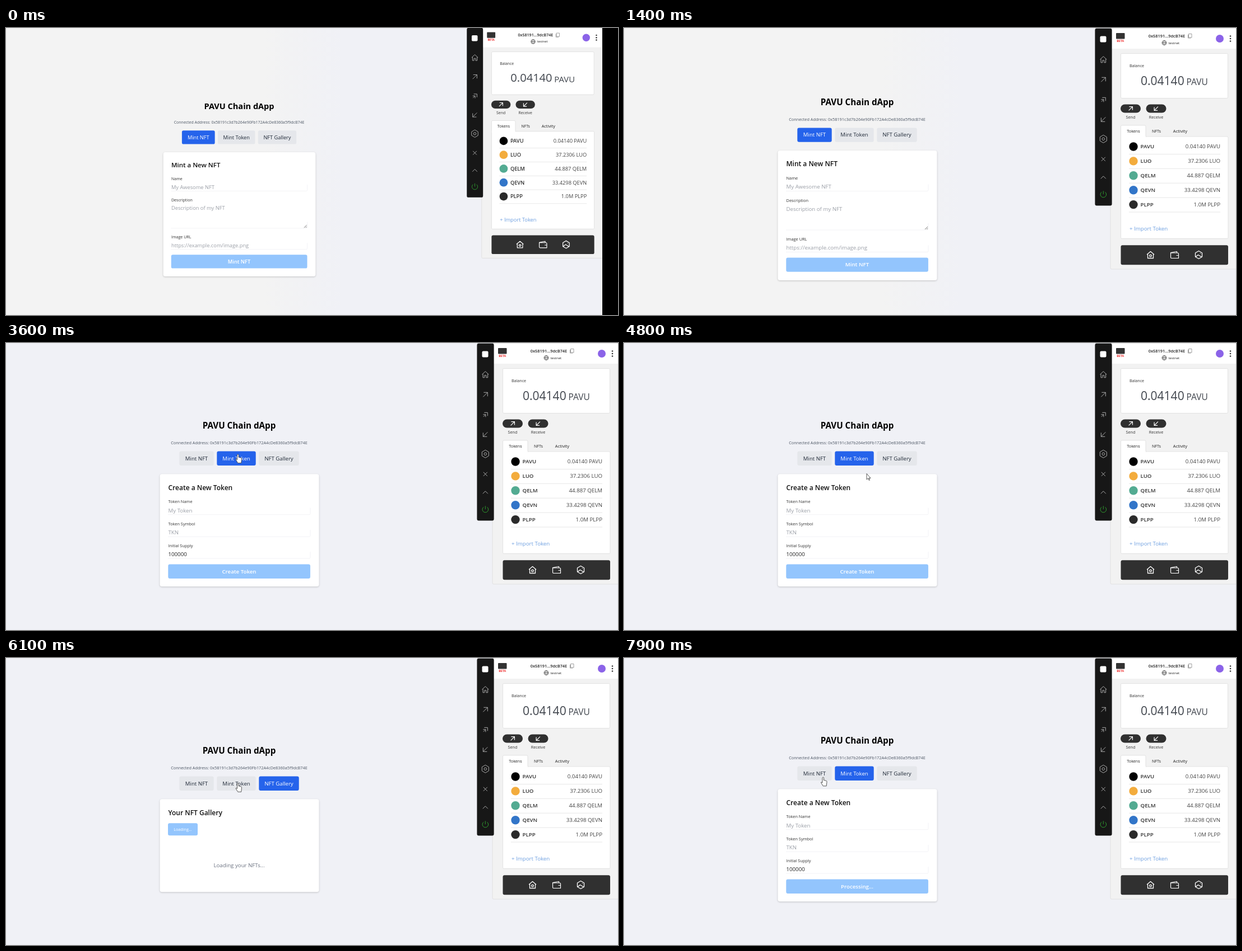
An HTML page that plays this animation: 1092x513 px, repeating every 8 s.

```html
<!DOCTYPE html>
<html lang="en">
<head>
<meta charset="utf-8">
<title>Token minting dApp</title>
<style>
html, body { margin: 0; width: 100%; height: 100%; overflow: hidden; background: #f0f1f6; }
svg { display: block; width: 1092px; height: 513px; font-family: "Open Sans", sans-serif; }
.card { filter: drop-shadow(0 1px 1.5px #0003); }
</style>
</head>
<body>
<svg id="stage" viewBox="0 0 1092 513"></svg>
<script>
const ADDRESS = '0x58191c3d7b264e90Fb172A4cDe8360a5f9dcB74E';
const COIN = 'PAVU';
const stage = document.getElementById('stage');

// Text is placed by the vertical centre of its capitals.
const text = (x, y, str, size, fill = '#222', weight = 400, anchor = 'start') =>
  `<text x="${x}" y="${y + size * .36}" font-size="${size}" fill="${fill}" font-weight="${weight}" text-anchor="${anchor}">${str}</text>`;
const mid = (x, y, str, size, fill, weight) => text(x, y, str, size, fill, weight, 'middle');
const rect = (x, y, w, h, fill, r = 0, extra = '') =>
  `<rect x="${x}" y="${y}" width="${w}" height="${h}" rx="${r}" fill="${fill}" ${extra}/>`;
const circle = (x, y, r, fill) => `<circle cx="${x}" cy="${y}" r="${r}" fill="${fill}"/>`;
const icon = (x, y, d, color = '#aaa', width = 1) =>
  `<path transform="translate(${x} ${y})" d="${d}" fill="none" stroke="${color}" stroke-width="${width}" stroke-linejoin="round"/>`;

const ARROW_OUT = 'M-4 4L4-4M-3-4H4V3';
const ARROW_IN = 'M4-4L-4 4M3 4H-4V-3';
const HOME = 'M-6 0L0-5.5 6 0M-4.3-1V5.5H-1.5V1.5H1.5V5.5H4.3V-1';
const HEXAGON = 'M0-7L6-3.5V3.5L0 7-6 3.5V-3.5Z';

function field(y, label, value, height = 0, color = '#9b9fa7') {
  const bottom = y + 23 + height;
  return text(289.5, y, label, 7.4, '#333', 500) + text(289.5, y + 15.5, value, 9.7, color) +
    icon(289, bottom, 'M0 0H252q2 0 2-2v-10', '#f3f3f6');
}
const card = (height, title) =>
  rect(274.5, 219, 284, height, '#fff', 4, 'class="card"') + text(289.5, 243, title, 12, '#111', 600);
const submit = (y, id, label) => rect(289.3, y + .4, 253.6, 25.4, '#93c5fd', 3) +
  `<g id="${id}">${mid(416, y + 13, label, 9.7, '#fff', 600)}</g>`;

const tabs = [[309, 62, 'Mint NFT'], [376, 70, 'Mint Token'], [451, 72, 'NFT Gallery']];
const views = [
  card(232, 'Mint a New NFT') + field(268.5, 'Name', 'My Awesome NFT') +
    field(308, 'Description', 'Description of my NFT', 30) + icon(539.5, 357.5, 'M-2.5 2.5L2.5-2.5M.5 2.5L2.5.5', '#666', .9) +
    field(377.5, 'Image URL', 'https://example.com/image.png') + submit(410, 'mint', 'Mint NFT'),
  card(201, 'Create a New Token') + field(268.5, 'Token Name', 'My Token') +
    field(308, 'Token Symbol', 'TKN') + field(347, 'Initial Supply', '100000', 0, '#222') +
    submit(380, 'create', 'Create Token'),
  card(166, 'Your NFT Gallery') + rect(289, 262, 53, 22, '#93c5fd', 3) +
    mid(315.5, 273.5, 'Loading...', 7.2, '#fff') + mid(416, 337, 'Loading your NFTs...', 9.7, '#6b7280'),
];
const app = mid(416, 132.5, COIN + ' Chain dApp', 15.2, '#000', 700) +
  mid(416, 163.5, 'Connected Address: ' + ADDRESS, 7.3, '#4b5563') +
  tabs.map(([x, w, name]) => rect(x + .3, 178.4, w - .6, 25.4, '#e5e7eb', 3, 'class="tab"') +
    `<g class="tabname">${mid(x + w / 2, 191, name, 9.6, 'inherit')}</g>`).join('') +
  views.map(v => `<g class="view">${v}</g>`).join('');

const tokens = [
  [COIN, '0.04140', '#000'], ['LUO', '37.2306', '#f3ac3d'], ['QELM', '44.887', '#53ab92'],
  ['QEVN', '33.4298', '#3275c8'], ['PLPP', '1.0M', '#2b2b2b'],
];
const sideIcons = [
  [56, HOME], [92, ARROW_OUT], [128, 'M-2-4H4V2M-4-.5H.5V4M.5-.5L-3.5 3.5'], [163, ARROW_IN],
  [198, HEXAGON + 'M-2.3 0a2.3 2.3 0 1 0 4.6 0a2.3 2.3 0 1 0-4.6 0'],
  [234, 'M-3.5-3.5L3.5 3.5M3.5-3.5L-3.5 3.5'], [267, 'M-4.5 2L0-2.5 4.5 2'],
  [297, 'M-3.2-4a5.3 5.3 0 1 0 6.4 0M0-6V0', '#2f9a2f'],
];
const border = 'stroke="#dcdcdc" stroke-width=".8"';
const wallet =
  rect(868, 0, 230, 431, '#f2f2f2', 2, border) + rect(870, 1, 222, 36, '#fff') +
  rect(840.4, .8, 30.2, 316.6, '#171717', 3) + rect(849.5, 14.5, 11, 11, '#fff', 2) +
  sideIcons.map(([y, d, color]) => icon(855.3, y + .3, d, color)).join('') +
  rect(878, 9, 15.5, 10.5, '#333', 1) + mid(885.7, 23, 'BETA', 5.3, '#e33', 700) +
  mid(968.5, 14.5, '0x58191...9dcB74E', 7.4, '#222', 600) +
  icon(1010, 14, 'M-2.5-3.5H3V3H-2.5ZM-3.5-2V4H1.5', '#888', .8) +
  icon(964, 26.5, 'M-4 0a4 4 0 1 0 8 0a4 4 0 1 0-8 0H4M0-4q-4 4 0 8q4-4 0-8', '#444', .8) +
  text(971.5, 26.5, 'testnet', 6, '#222') + circle(1063, 19, 7, '#8b63e8') +
  [14.5, 19, 23.5].map(y => circle(1082, y, 1.3, '#333')).join('') +
  rect(886.5, 45.5, 191, 80, '#fff', 2, border) + text(902, 67, 'Balance', 7.1, '#333') +
  text(922, 94, '0.04140', 21, '#3f444c') + text(1003.5, 96.5, COIN, 15.5, '#3f444c') +
  [[904, ARROW_OUT, 'Send'], [949.5, ARROW_IN, 'Receive']].map(([x, d, name]) =>
    rect(x - 18, 136.5, 36, 15, '#303030', 7.5) +
    `<g transform="translate(${x} 144) scale(.85)">${icon(0, 0, d, '#fff', 1.4)}</g>` +
    mid(x, 159.5, name, 7.2, '#333')).join('') +
  rect(886.5, 194, 191.5, 182.5, '#fff', 2, border) +
  `<path d="M886.5 195V176q0-2 2-2h40.5q2 0 2 2V195" fill="#fff" ${border}/>` + rect(887, 193, 43.6, 3, '#fff') +
  mid(909, 184, 'Tokens', 7.2, '#222', 500) + mid(950, 184, 'NFTs', 7.2) + mid(992.5, 184, 'Activity', 7.6) +
  tokens.map(([name, amount, color], i) => {
    const y = 212 + i * 25.9;
    return circle(909, y, 7.7, color) + text(921.5, y, name, 9.7, '#333', 600) +
      text(1064, y, `${amount} ${name}`, 9.7, '#444', 400, 'end') + rect(901, y + 13, 163, .8, '#e2e2e2');
  }).join('') +
  text(902, 359, '+ Import Token', 9.7, '#6d9fe0') + rect(886.5, 388.2, 191.5, 35, '#303030', 3) +
  icon(939.5, 405.5, 'M-6.5-.5L0-6 6.5-.5M-5-1V6H5V-1M-1.8 1.5a1.8 1.8 0 1 0 3.6 0a1.8 1.8 0 1 0-3.6 0', '#fff', 1.3) +
  icon(982.5, 405.5, 'M-7-3.5H5.5q1.5 0 1.5 1.5V6H-5.5q-1.5 0-1.5-1.5V-4L4-6V-3.5M3 1H7', '#fff', 1.2) +
  icon(1025.5, 405.5, HEXAGON + 'M-5.5 3.5L-1 0 5.5 4M2.5-2.5h.8', '#fff', 1.3);

stage.innerHTML = `
  <linearGradient id="tint"><stop offset=".42" stop-color="#f3f3f3"/><stop offset=".55" stop-color="#f0f1f6"/></linearGradient>
  ${rect(0, 0, 1092, 513, '#f0f1f6')}
  ${rect(0, 0, 1092, 513, 'url(#tint)', 0, 'id="wash"')}
  <g id="app">${app}</g><g id="wallet">${wallet}</g>
  ${rect(1064, 0, 28, 513, '#000', 0, 'id="strip"')}
  <g id="cursor" fill="#fff" stroke="#444" stroke-width=".9" stroke-linejoin="round">
    <path id="hand" d="M-3 2V-6.5a1.3 1.3 0 0 1 2.6 0V-2.500l4 .8q1.6.4 1.4 2l-.8 7.5h-6l-3.6-6q-.4-1.6 1.4-.6z"/>
    <path id="arrow" d="M-2-6V4.5L.6 2.4 2.2 6 3.6 5.4 2 2H5z"/>
  </g>`;

const $ = id => document.getElementById(id);
const all = selector => [...document.querySelectorAll(selector)];
const [viewEls, tabEls, tabNames] = ['.view', '.tab', '.tabname text'].map(all);
const createLabel = document.querySelector('#create text');
const show = (el, on) => el.setAttribute('visibility', on ? 'inherit' : 'hidden');
const move = (el, x, y, scale = 1) => el.setAttribute('transform', `translate(${x} ${y}) scale(${scale})`);

// Pointer path: time, x, y
const path = [[2700, 452, 268], [3100, 415.5, 205.5], [3700, 415.5, 207], [4500, 424, 226], [4800, 435, 239.5],
  [5000, 480, 216], [5400, 480, 226], [5800, 424, 243], [6000, 418, 236], [6100, 415.5, 231.5],
  [7000, 415.5, 228], [7500, 361, 221], [7800, 357, 221], [8000, 357, 221]];

function pointer(t) {
  const i = path.findIndex(p => p[0] > t);
  const [t0, x0, y0] = path[i - 1], [t1, x1, y1] = path[i];
  const k = (t - t0) / (t1 - t0);
  return [x0 + (x1 - x0) * k, y0 + (y1 - y0) * k];
}

function draw(t) {
  const small = t < 100;
  const view = t < 3400 ? 0 : t < 5100 ? 1 : t < 7000 ? 2 : 1;
  const dy = [0, 15.2, 33.2][view];
  move($('app'), small ? 17.9 : 0, small ? 12.5 : dy, small ? .957 : 1);
  move($('wallet'), small ? 18 : 0, small ? -1 : 0, small ? .957 : 1);
  show($('strip'), small);
  show($('wash'), t < 2000);
  viewEls.forEach((el, i) => show(el, i === view));
  tabEls.forEach((el, i) => el.setAttribute('fill', i === view ? '#2563eb' : '#e5e7eb'));
  tabNames.forEach((el, i) => el.setAttribute('fill', i === view ? '#fff' : '#1f2937'));
  createLabel.textContent = t < 7000 ? 'Create Token' : 'Processing...';

  show($('cursor'), t >= 2700);
  if (t >= 2700) {
    const [x, y] = pointer(t);
    const overTab = y > 172 + dy && y < 212 + dy;
    move($('cursor'), x, y);
    show($('hand'), overTab);
    show($('arrow'), !overTab);
  }
}

function tick() {
  draw(Math.floor(performance.now() % 8000 / 100) * 100);
  requestAnimationFrame(tick);
}
tick();
</script>
</body>
</html>
```
